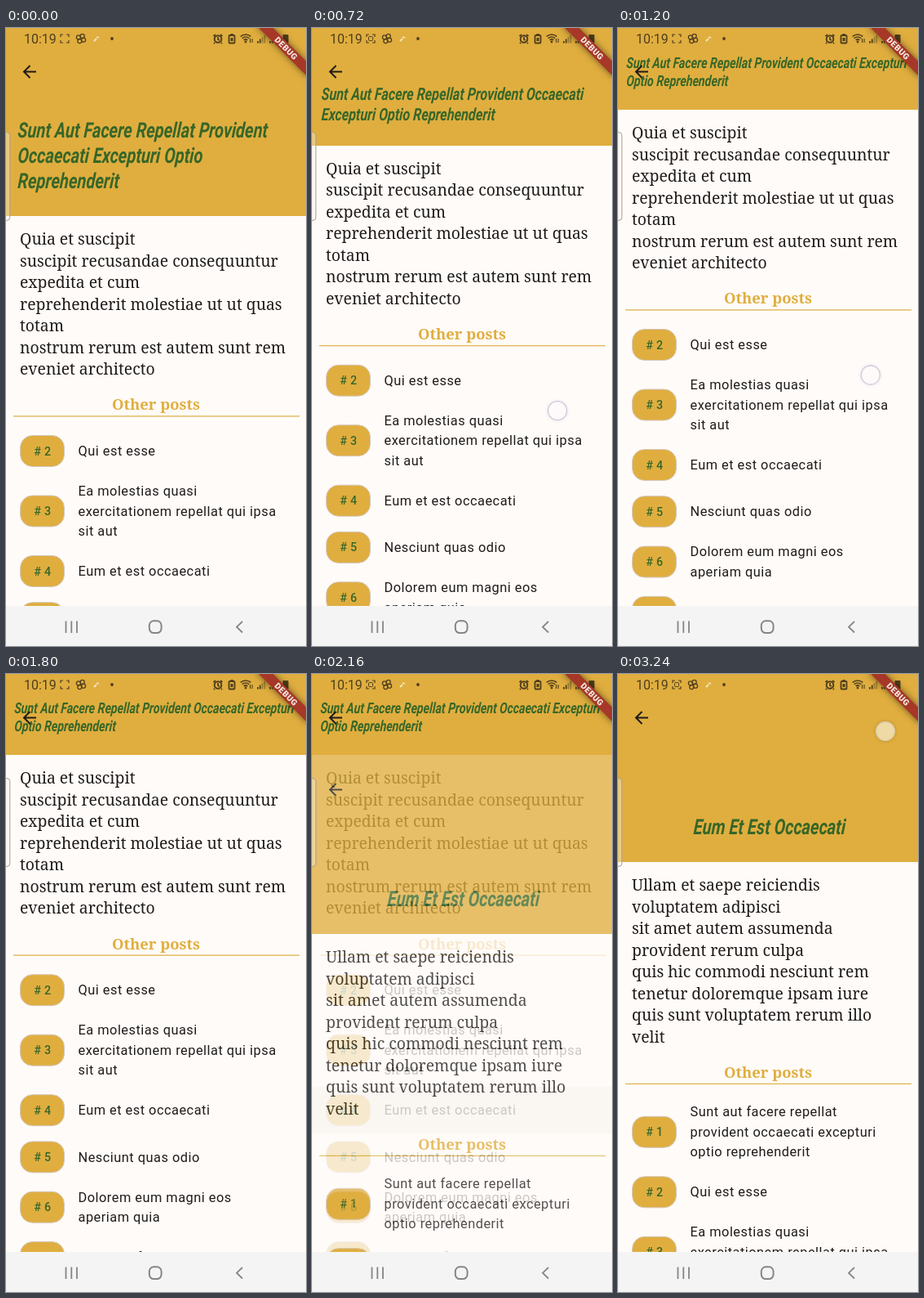
These frames come from a looping animation (368x756 px, 3.36 s). An HTML page with a canvas:

```html
<!DOCTYPE html>
<html lang="en">
<head>
<meta charset="utf-8">
<title>Posts app</title>
<style>
html, body { margin: 0; width: 368px; height: 756px; overflow: hidden; background: #fffbf8; }
canvas { display: block; width: 368px; height: 756px; }
</style>
</head>
<body>
<canvas id="stage"></canvas>
<script>
const W = 368, H = 756, NAV = 707, HEAD = 230, STEP = 120, STEPS = 28;
const GOLD = '#e0ae3f', PAPER = '#fffbf8', INK = '#1f1b1a', GREEN = '#376628';
const dpr = window.devicePixelRatio || 1;

function setup(cv) {
  cv.width = W * dpr;
  cv.height = H * dpr;
  const c = cv.getContext('2d');
  c.scale(dpr, dpr);
  return c;
}
const stage = setup(document.getElementById('stage'));
const layerCanvas = document.createElement('canvas');
const layer = setup(layerCanvas);

// Font size at which a sample line takes the wanted room.
function sizeFor(weight, family, sample, width) {
  stage.font = `${weight} 100px ${family}`;
  return 100 * width / stage.measureText(sample).width;
}
const SERIF = '"Noto Serif", serif', SANS = 'Roboto, sans-serif';
const bodyFont = `${sizeFor(400, SERIF, 'suscipit recusandae consequuntur', 317)}px ${SERIF}`;
const headFont = `600 ${sizeFor(600, SERIF, 'Other posts', 108)}px ${SERIF}`;
const titleFont = `italic 700 26px ${SANS}`;
const CONDENSE = 0.775, SLANT = -0.07;

const posts = {
  1: 'Sunt aut facere repellat|provident occaecati excepturi|optio reprehenderit',
  2: 'Qui est esse',
  3: 'Ea molestias quasi|exercitationem repellat qui ipsa|sit aut',
  4: 'Eum et est occaecati',
  5: 'Nesciunt quas odio',
  6: 'Dolorem eum magni eos|aperiam quia',
  7: 'Magnam facilis autem'
};
const first = {
  title: s => s > 0.86
    ? 'Sunt Aut Facere Repellat Provident|Occaecati Excepturi Optio|Reprehenderit'
    : s > 0.72
      ? 'Sunt Aut Facere Repellat Provident Occaecati|Excepturi Optio Reprehenderit'
      : 'Sunt Aut Facere Repellat Provident Occaecati Excepturi|Optio Reprehenderit',
  body: 'Quia et suscipit|suscipit recusandae consequuntur|expedita et cum|reprehenderit molestiae ut ut quas|totam|nostrum rerum est autem sunt rem|eveniet architecto',
  others: [2, 3, 4, 5, 6, 7]
};
const second = {
  title: () => 'Eum Et Est Occaecati',
  centered: true,
  body: 'Ullam et saepe reiciendis|voluptatem adipisci|sit amet autem assumenda|provident rerum culpa|quis hic commodi nesciunt rem|tenetur doloremque ipsam iure|quis sunt voluptatem rerum illo|velit',
  others: [1, 2, 3]
};

function text(c, str, x, y, font, color, align = 'left', spacing = 0) {
  c.font = font;
  c.fillStyle = color;
  c.textAlign = align;
  c.letterSpacing = spacing + 'px';
  c.fillText(str, x, y);
}

function stroke(c, color, width, ...lines) {
  c.strokeStyle = color;
  c.lineWidth = width;
  c.beginPath();
  for (const [x, y, ...rest] of lines) {
    c.moveTo(x, y);
    for (let i = 0; i < rest.length; i += 2) c.lineTo(rest[i], rest[i + 1]);
  }
  c.stroke();
}

function disc(c, x, y, r, color) {
  c.fillStyle = color;
  c.beginPath();
  c.arc(x, y, r, 0, 7);
  c.fill();
}

function ring(c, x, y, r, color, width) {
  c.strokeStyle = color;
  c.lineWidth = width;
  c.beginPath();
  c.arc(x, y, r, 0, 7);
  c.stroke();
}

function box(c, x, y, w, h, r, fill, line, width = 1) {
  c.beginPath();
  c.roundRect(x, y, w, h, r);
  if (fill) { c.fillStyle = fill; c.fill(); }
  if (line) { c.strokeStyle = line; c.lineWidth = width; c.stroke(); }
}

function drawTitle(c, page, bottom, scroll) {
  const s = 1 - scroll * 0.00225;
  const lines = page.title(s).split('|');
  lines.forEach((line, i) => {
    c.save();
    c.translate(page.centered ? 185.5 : 14 * s, bottom - 17 - 16.8 * s + (i + 1 - lines.length) * 31 * s);
    c.transform(s * CONDENSE, 0, s * SLANT, s, 0, 0);
    text(c, line, 0, 0, titleFont, GREEN, page.centered ? 'center' : 'left');
    c.restore();
  });
}

function drawPage(c, page, scroll, pressed) {
  const bottom = HEAD - scroll;
  c.fillStyle = PAPER;
  c.fillRect(0, 0, W, H);
  c.fillStyle = GOLD;
  c.fillRect(0, 0, W, Math.round(bottom));
  drawTitle(c, page, bottom, scroll);
  stroke(c, INK, 2, [37, 53.5, 22, 53.5], [29.5, 46, 22, 53.5, 29.5, 61]);

  const body = page.body.split('|');
  body.forEach((line, i) => text(c, line, 17, bottom + 35.2 + i * 26.5, bodyFont, INK));
  const end = bottom + 35.2 + (body.length - 1) * 26.5;
  text(c, 'Other posts', 184, end + 43.2, headFont, GOLD, 'center');
  c.fillStyle = '#dfb95c';
  c.fillRect(9, end + 50, 351, 1.4);

  let top = end + 64.7;
  for (const id of page.others) {
    const lines = posts[id].split('|');
    const height = [57.2, 65.5, 89.8][lines.length - 1];
    const mid = top + height / 2;
    if (id === pressed) {
      c.fillStyle = 'rgba(70,55,50,.11)';
      c.fillRect(0, top, W, height);
    }
    box(c, 17.5, mid - 19, 54, 38, 15, GOLD, '#d3c7bd');
    text(c, '# ' + id, 44.8, mid + 5, `500 14.3px ${SANS}`, GREEN, 'center', 0.2);
    lines.forEach((line, i) =>
      text(c, line, 88.5, mid + 5.6 + (i - (lines.length - 1) / 2) * 24.5, `16.35px ${SANS}`, INK, 'left', 0.5));
    top += height;
  }
}

function drawStatus(c, recording) {
  const ink = '#4f3f1c';
  text(c, '10:19', 22, 18.7, `16px ${SANS}`, ink);
  stroke(c, ink, 1.2, [67, 11, 67, 8, 70, 8], [74, 8, 77, 8, 77, 11], [67, 15, 67, 18, 70, 18], [74, 18, 77, 18, 77, 15]);
  if (recording) box(c, 69.5, 10.5, 5, 5, 1, null, ink);
  for (let i = 0; i < 4; i++) {
    const a = i * Math.PI / 2 + 0.5;
    ring(c, 92 + 3.5 * Math.cos(a), 13 + 3.5 * Math.sin(a), 2.5, ink, 1.3);
  }
  stroke(c, '#f5e6c4', 1.8, [108, 16, 111, 13], [111, 11, 114, 12]);
  disc(c, 130, 13, 1.9, ink);

  ring(c, 260, 13.5, 4.3, ink, 2);
  stroke(c, ink, 1.8, [260, 11, 260, 14, 262, 15], [254.5, 10, 257, 8], [263, 8, 265.5, 10], [256, 18, 255, 19], [264, 18, 265, 19]);
  box(c, 273.5, 9, 7, 9.5, 1, null, ink, 1.8);
  c.fillStyle = ink;
  c.fillRect(275.3, 7, 3.4, 2);
  c.fillRect(275.5, 12, 3, 4);
  for (const r of [3.5, 6.5, 9.5]) {
    c.lineWidth = 1.5;
    c.beginPath();
    c.arc(294, 17.5, r, -2.3, -0.84);
    c.stroke();
  }
  disc(c, 294, 17, 1.4, ink);
  stroke(c, ink, 1.1, [299.5, 18, 299.5, 13], [302, 13, 302, 18]);
  for (const x of [308, 323]) {
    for (let i = 0; i < 4; i++) {
      c.fillStyle = i < 2 ? ink : 'rgba(79,63,28,.45)';
      c.fillRect(x + i * 2.8, 16 - i * 2.5, 1.8, 2.5 + i * 2.5);
    }
  }
  box(c, 339.5, 8, 7, 10.5, 1, ink);
}

function drawRibbon(c) {
  c.save();
  c.translate(W, 0);
  c.rotate(Math.PI / 4);
  c.shadowColor = 'rgba(0,0,0,.55)';
  c.shadowBlur = 9 * dpr;
  c.fillStyle = '#a73828';
  c.fillRect(-44, 28.6, 88, 12.3);
  c.shadowColor = 'transparent';
  text(c, 'DEBUG', 0.4, 38.4, `900 10.2px ${SANS}`, '#f6e9e4', 'center', 0.5);
  c.restore();
}

function drawNav(c) {
  const gray = '#858585';
  c.fillStyle = '#f4f4f4';
  c.fillRect(0, NAV, W, H - NAV);
  stroke(c, gray, 1.8, [73.5, 725.5, 73.5, 740], [80.3, 725.5, 80.3, 740], [87, 725.5, 87, 740]);
  box(c, 175.8, 725.3, 14.8, 14.8, 5.5, null, gray, 2);
  stroke(c, gray, 1.8, [290, 726, 283, 732.7, 290, 739.5]);
}

function drawTouch(c, x, y, solid) {
  c.save();
  c.shadowColor = solid ? 'rgba(120,80,10,.45)' : 'rgba(120,120,170,.25)';
  c.shadowBlur = 4 * dpr;
  disc(c, x, y, 11.5, solid ? '#efd9a4' : '#fdfaf9');
  c.restore();
  ring(c, x, y, 11.5, solid ? '#d9cba8' : '#cfcbdd', 1.3);
}

// Linear interpolation through [step, value] pairs.
function track(keys, k) {
  if (k <= keys[0][0]) return keys[0][1];
  for (let i = 1; i < keys.length; i++) {
    const [a, u] = keys[i - 1], [b, v] = keys[i];
    if (k <= b) return u + (v - u) * (k - a) / (b - a);
  }
  return keys[keys.length - 1][1];
}
const scrollKeys = [[0, 0], [1, 4], [6, 86.3], [8, 116], [9, 125], [10, 130], [11, 130.8]];
const riseKeys = [[17, 260], [18, 88], [19, 24], [20, 5], [21, 0]];
const fadeKeys = [[16, 0], [17, 0.22], [18, 0.77], [19, 0.95], [20, 1]];

function draw(k) {
  const c = stage;
  const scroll = track(scrollKeys, k);
  const fade = track(fadeKeys, k);
  if (fade < 1) drawPage(c, first, scroll, k >= 16 ? 4 : 0);
  if (fade > 0) {
    drawPage(layer, second, 0);
    c.globalAlpha = fade;
    c.drawImage(layerCanvas, 0, track(riseKeys, k), W, H);
    c.globalAlpha = 1;
  }
  box(c, -6, 127.5, 10.8, 108, 4, 'rgba(245,240,232,.4)', '#a89d8c');
  drawStatus(c, k === 6 || k >= 18);
  drawRibbon(c);
  drawNav(c);
  if (k >= 1 && k <= 10) drawTouch(c, 301 + (scroll - 86) * 0.2, 554.5 - scroll, false);
  if (k === 27) drawTouch(c, 328, 70, true);
}

let last = -1;
const start = performance.now();
function tick() {
  const k = Math.floor((performance.now() - start) / STEP) % STEPS;
  if (k !== last) draw(last = k);
  requestAnimationFrame(tick);
}
tick();
</script>
</body>
</html>
```
